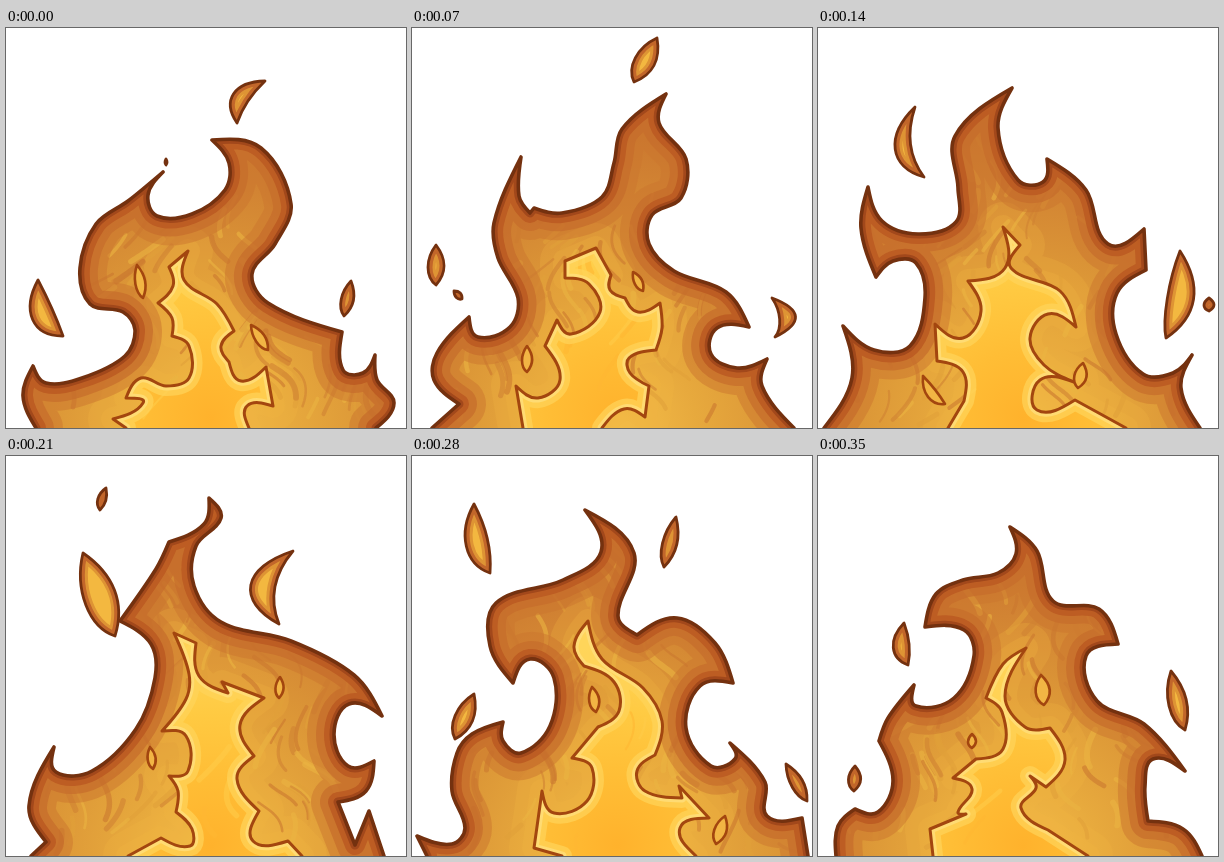
An HTML page with a canvas for the animation above (420 ms loop, 400 by 400 pixels).

```html
<!DOCTYPE html>
<html>
<head>
<meta charset="utf-8">
<title>Fire</title>
<style>
html, body { margin: 0; height: 100%; overflow: hidden; background: #fff; }
canvas { display: block; width: 400px; height: 400px; }
</style>
</head>
<body>
<canvas id="stage" width="400" height="400"></canvas>
<script>
const g = document.getElementById('stage').getContext('2d');
const STEP = 70;

// body, core: key points joined by smooth curves, "/" marks a sharp corner.
// sparks, drops: tip x, y, tail x, y, bend, half width.
const poses = [
  {
    body: '30,400 17,368 27,338/40,355 76,350 119,328 129,302 117,284 84,276 74,240 90,196 122,173 157,144/142,167 151,188 186,186 219,162 223,135 206,112/255,120 285,176 269,216 246,246 262,275 336,304/337,342 357,345 369,327/371,352 388,375 370,400',
    core: '120,400 107,391/137,375 120,370/135,350 160,358 183,350 183,318 166,308/166,290 152,275/167,258 163,239/182,223/178,252 211,276 228,303/215,318 223,334/235,353 260,339/267,378/241,378 243,400',
    sparks: [[259, 53, 231, 95, 11, 8], [32, 252, 57, 308, 10, 11], [345, 253, 338, 288, 0, 6], [160, 131, 160, 137, 0, 1]],
    drops: [[131, 237, 137, 270, 0, 5], [245, 297, 262, 322, 0, 5]]
  },
  {
    body: '20,400 47,376/22,352 25,325 57,289/66,309 98,299 106,270 86,230 82,195 109,129/107,168 118,185/122,180/150,185 190,169 202,135 210,101 254,66/247,95 274,131 269,170 240,187 237,216 262,243 314,264 337,299/305,300 299,326 325,340 355,331/350,358 382,400',
    core: '111,400 104,358/126,370 148,352 133,318/145,292/159,306 188,284 177,256 153,250/153,233/184,220/199,247/198,262 213,270/226,284 248,275/250,300 244,322/217,330 218,345 237,358/233,389/212,381 190,400',
    sparks: [[245, 10, 222, 54, 0, 10], [24, 217, 24, 257, 0, 8], [42, 263, 50, 271, 0, 3], [360, 270, 363, 309, -14, 8]],
    drops: [[221, 244, 231, 263, 0, 4], [115, 318, 115, 344, 0, 5]]
  },
  {
    body: '6,400 34,350 25,298/56,322 92,318 107,270 98,235 75,233 58,249/43,200 50,159/64,193 100,206 138,194 140,160 137,108 194,60/180,100 200,152 225,154 229,131/268,162 290,216 326,201/328,242/299,265 298,306 325,346 355,345 374,327/363,360 382,400',
    core: '130,400 146,373/145,344 119,333/117,296/145,310 163,283 150,253/187,240 185,199/202,217/193,240 242,263 258,299/230,286 212,310 226,337 256,354/222,352 219,382 257,372/308,400',
    sparks: [[97, 79, 106, 149, 17, 8], [362, 223, 348, 310, -8, 13], [391, 270, 391, 283, 0, 5]],
    drops: [[105, 348, 127, 376, 4, 5], [265, 335, 260, 360, 0, 6]]
  },
  {
    body: '25,400 40,386/23,350 48,291/50,316 86,315 130,273 149,222 145,188 114,165/150,113 163,86/198,68 203,42/215,62 190,90 188,130 215,166 285,185 348,219 376,260/343,248 328,278 342,310 368,305/360,335 332,346/349,389/363,355/378,400',
    core: '122,400 155,382/184,390 186,373 170,356/172,335 163,320/182,315 180,280 156,275/180,243 183,218 168,177/190,187/193,220 222,237/216,226/258,242/234,269 248,300/231,323 253,355/247,385 282,385/296,400',
    sparks: [[100, 32, 94, 54, 1, 4], [77, 97, 109, 180, 0, 16], [287, 95, 273, 168, 23, 12]],
    drops: [[274, 221, 273, 242, 0, 4], [144, 291, 147, 313, 0, 4]]
  },
  {
    body: '15,400 5,380/40,388 53,372 40,335 45,297 60,278 91,266/91,285 109,297 138,270 142,222 118,203 101,227/78,190 84,147 151,124 189,96 173,54/222,97 206,160 225,179/265,162 303,187 321,227/288,230 274,272 299,310 323,303 318,287/353,326 355,360 390,362/396,400',
    core: '150,400 122,392/130,335/142,357 175,345 180,312 160,302/186,271/207,255 202,226 172,210/162,190 176,165/190,203 231,232 250,265 243,299/225,315 233,335 270,342/267,330/297,362/268,372 284,400',
    sparks: [[62, 48, 78, 117, 6, 11], [264, 61, 252, 111, 0, 7], [62, 238, 43, 283, 0, 9], [374, 308, 395, 345, 0, 6]],
    drops: [[180, 231, 184, 256, 0, 5], [313, 360, 304, 388, 0, 6]]
  },
  {
    body: '18,400 20,370 37,353/60,356 75,325 61,285/70,262 96,229/98,250 136,242 156,200 146,174 107,171/118,138 145,124 180,117 198,98 192,71/219,95 235,145 281,153 300,188/268,200 279,245 326,268 367,315/335,303 327,330 330,365/365,373 384,400',
    core: '115,400 112,373/148,358/140,356 154,333 135,322/158,303/185,293 184,256 168,242/185,208 208,192/187,240 207,271 232,272/247,304 228,331/212,320/218,332 203,352 230,374/270,400',
    sparks: [[86, 167, 90, 209, 5, 8], [353, 215, 367, 274, 1, 9], [37, 310, 36, 335, 0, 6]],
    drops: [[223, 219, 226, 249, 0, 7], [154, 278, 154, 292, 0, 4]]
  }
];

// Handle at p, a third of the way along its piece, heading from one neighbour to the other.
function handle(p, from, to, reach) {
  const dx = to[0] - from[0], dy = to[1] - from[1], k = reach / 3 / Math.hypot(dx, dy);
  return [p[0] + dx * k, p[1] + dy * k];
}

const middle = (a, b) => [(a[0] + b[0]) / 2, (a[1] + b[1]) / 2];

// Builds a smooth outline that runs off the bottom of the stage.
function outline(text) {
  const path = new Path2D();
  let last;
  for (const part of text.split('/')) {
    const pts = part.split(' ').map(p => p.split(',').map(Number));
    if (last) pts.unshift(last);
    else path.moveTo(pts[0][0], 450), path.lineTo(...pts[0]);
    for (let i = 0; i + 1 < pts.length; i++) {
      const a = pts[i], b = pts[i + 1], before = pts[i - 1], after = pts[i + 2];
      const reach = Math.hypot(b[0] - a[0], b[1] - a[1]);
      const c = before && handle(a, before, b, reach);
      const d = after && handle(b, after, a, reach);
      path.bezierCurveTo(...(c || middle(a, d || b)), ...(d || middle(b, c || a)), ...b);
    }
    last = pts[pts.length - 1];
  }
  path.lineTo(last[0], 450);
  path.closePath();
  return path;
}

// A bent leaf with two pointed ends.
function leaf([x, y, tx, ty, bend, half]) {
  const path = new Path2D(), dx = tx - x, dy = ty - y, len = Math.hypot(dx, dy);
  const at = (t, off) => [x + dx * t - dy / len * off / 0.75, y + dy * t + dx / len * off / 0.75];
  path.moveTo(x, y);
  path.bezierCurveTo(...at(0.35, bend + half), ...at(0.8, bend + half), tx, ty);
  path.bezierCurveTo(...at(0.7, bend - half), ...at(0.35, bend - half), x, y);
  path.closePath();
  return path;
}

function line(path, color, width, alpha = 1) {
  g.globalAlpha = alpha;
  g.strokeStyle = color;
  g.lineWidth = width;
  g.stroke(path);
  g.globalAlpha = 1;
}

function radial(y, radius, colors) {
  const fill = g.createRadialGradient(205, y, 0, 205, y, radius);
  colors.forEach((c, i) => fill.addColorStop(i / (colors.length - 1), c));
  return fill;
}

function inside(path, fill, draw) {
  g.save();
  g.clip(path);
  g.fillStyle = fill;
  g.fill(path);
  draw();
  g.restore();
}

// Wavy brush marks that rise along a slowly turning flow.
function streaks(count, colors, seed) {
  const rnd = () => (seed = seed * 16807 % 2147483647) / 2147483647;
  for (let i = 0; i < count; i++) {
    const path = new Path2D();
    let x = rnd() * 400, y = 60 + rnd() * 340;
    path.moveTo(x, y);
    for (let n = 5 + rnd() * 10; n > 0; n--) {
      const lean = (200 - x) / 350 + 0.8 * Math.sin(x / 31 + y / 23);
      x += 3 * Math.sin(lean);
      y -= 3 * Math.cos(lean);
      path.lineTo(x, y);
    }
    line(path, colors[i % colors.length], 2 + rnd() * 4, 0.6);
  }
}

function paint({ body, core, sparks, drops }, seed) {
  const outer = outline(body), inner = outline(core);
  g.clearRect(0, 0, 400, 400);
  g.lineJoin = g.lineCap = 'round';

  inside(outer, radial(400, 320, ['#f4bd48', '#e7a93d', '#dc9737', '#d28433', '#c8722d']), () => {
    line(inner, '#efb441', 50, 0.25);
    line(inner, '#efb441', 24, 0.25);
    streaks(170, ['#d08232', '#e2a03a', '#cb7830', '#ecb442'], seed);
    line(outer, '#cb772f', 54, 0.5);
    line(outer, '#c76d2b', 36, 0.7);
    line(outer, '#bb5a22', 20, 0.85);
    line(outer, '#a2481b', 9);
  });
  line(outer, '#74310f', 3.6);

  inside(inner, radial(390, 200, ['#ffb22c', '#ffbd35', '#ffca42', '#ffd65a']), () => {
    streaks(50, ['#ffb833', '#ffcb48'], seed + 7);
    line(inner, '#ffd45a', 20, 0.7);
    line(inner, '#ffdf7c', 9, 0.8);
  });
  line(inner, '#a3460f', 3);

  for (const drop of drops.map(leaf)) {
    g.fillStyle = '#f2b544';
    g.fill(drop);
    line(drop, '#a3460f', 2.6);
  }
  for (const spark of sparks.map(leaf)) {
    inside(spark, '#f3b840', () => {
      line(spark, '#de9434', 15);
      line(spark, '#c2662a', 9);
    });
    line(spark, '#74310f', 2.8);
  }
}

let shown = -1;
function tick() {
  const index = Math.floor(performance.now() / STEP) % poses.length;
  if (index !== shown) {
    shown = index;
    paint(poses[index], 977 + index * 131);
  }
  requestAnimationFrame(tick);
}
tick();
</script>
</body>
</html>
```
